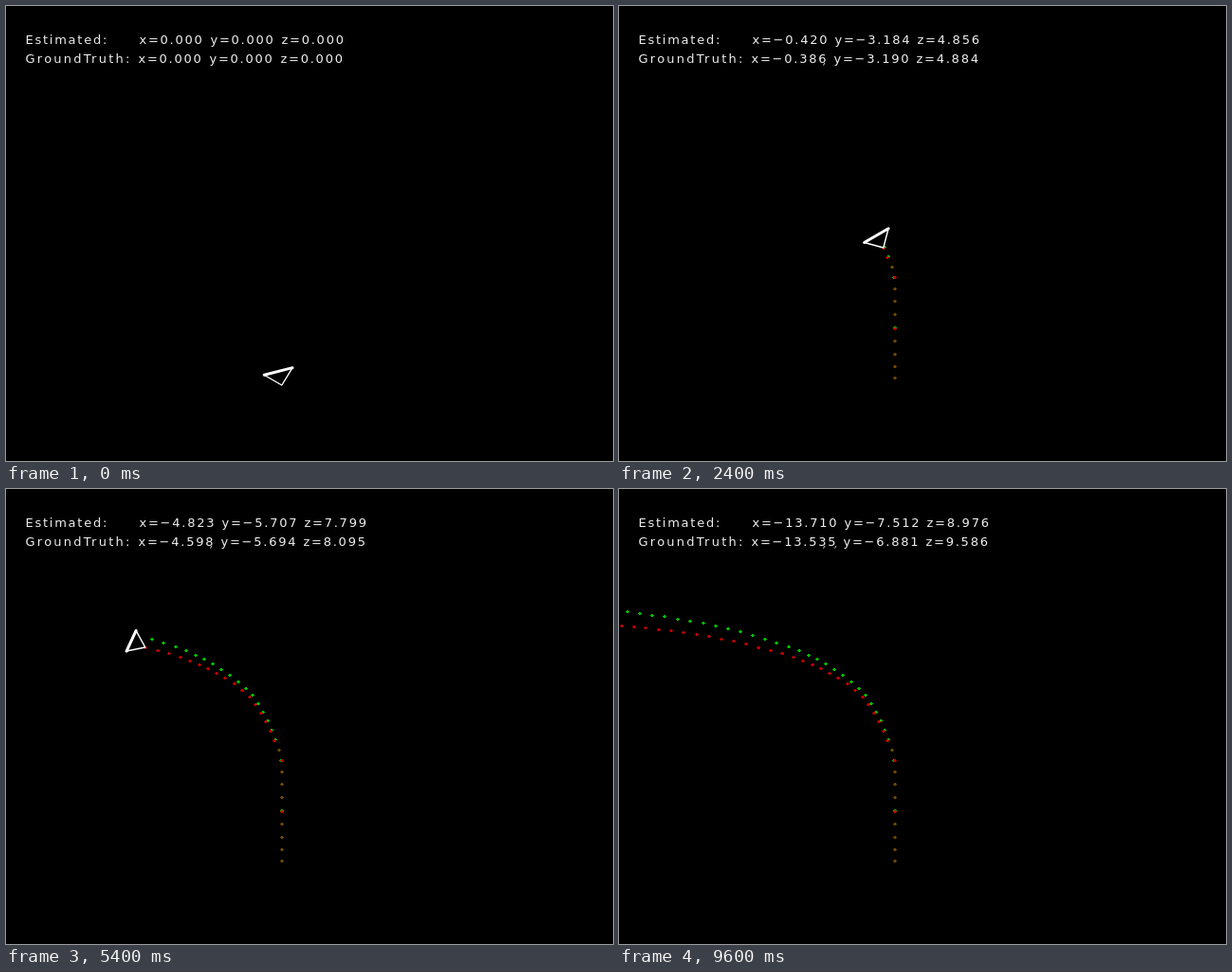
An HTML page for the animation above (9800 ms loop, 640 px wide and 480 px high).

```html
<!DOCTYPE html>
<html lang="en">
<head>
<meta charset="utf-8">
<title>Trajectory</title>
<style>
  html, body { margin: 0; width: 100%; height: 100%; overflow: hidden; background: #000; }
  svg { display: block; }
  text { font: 13px "DejaVu Sans", sans-serif; letter-spacing: 1.75px; fill: #eee; }
  .wide { letter-spacing: 2.25px; }
  .marker { fill: none; stroke: #fff; stroke-linecap: round; stroke-linejoin: round; }
</style>
</head>
<body>
<svg width="640" height="480" viewBox="0 0 640 480">
  <g shape-rendering="crispEdges">
    <path id="truth" fill="#00c000"/>
    <path id="guess" fill="#c00000"/>
    <path id="both" fill="#704800"/>
  </g>
  <path id="sides" class="marker" stroke-width="1.4"/>
  <path id="base" class="marker" stroke-width="3"/>
  <text x="20.5" y="40">Estimated:</text>
  <text x="20.5" y="60" class="wide">GroundTruth:</text>
  <g id="values"></g>
  <path id="traces" fill="none" stroke="#ddd"/>
</svg>
<script>
const STEP = 200, COUNT = 49, SCALE = 30;
const $ = id => document.getElementById(id);

// Key points of the true path: step, x, y, z in metres
const PATH = [
  [0, 0, 0, 0], [4, .001, -1.01, 1.583], [8, -.0001, -2.207, 3.427],
  [12, -.386, -3.19, 4.884], [16, -1.049, -4.01, 6.106], [20, -2.149, -4.78, 7.017],
  [24, -3.384, -5.35, 7.683], [27, -4.598, -5.694, 8.095], [31, -6.317, -6.07, 8.551],
  [35, -8.11, -6.377, 8.867], [40, -10.253, -6.591, 9.142], [48, -13.535, -6.881, 9.586]
];

// How far the estimate strays from the truth
const DRIFT = [
  [0, 0, 0, 0], [8, .0151, -.016, -.012], [16, -.108, .027, -.057], [27, -.225, -.013, -.296],
  [35, -.223, -.156, -.439], [40, -.21, -.311, -.522], [48, -.175, -.631, -.61]
];

// Monotone cubic through the key points, easing at both ends
function curve(keys, t) {
  const last = keys.length - 1;
  const n = Math.min(keys.findLastIndex(k => k[0] <= t), last - 1);
  const span = keys[n + 1][0] - keys[n][0], s = (t - keys[n][0]) / span;

  return [1, 2, 3].map(c => {
    const slope = k => (keys[k + 1][c] - keys[k][c]) / (keys[k + 1][0] - keys[k][0]);
    const tangent = k => {
      if (k === 0) return slope(0) / 2;
      if (k === last) return slope(last - 1) / 2;
      const a = slope(k - 1), b = slope(k);
      return a * b > 0 ? 2 * a * b / (a + b) : 0;
    };
    const ease = s * s * (3 - 2 * s);
    return keys[n][c] * (1 - ease) + keys[n + 1][c] * ease
      + span * s * (1 - s) * ((1 - s) * tangent(n) - s * tangent(n + 1));
  });
}

const steps = Array.from({ length: COUNT }, (_, i) => {
  const truth = curve(PATH, i), drift = curve(DRIFT, i);
  return { truth, guess: truth.map((v, c) => v + drift[c]) };
});

const screen = ([x, , z]) => [290 + Math.trunc(SCALE * x), 400 - Math.trunc(SCALE * z)];
const dot = ([x, y]) => `M${x - 1} ${y}h1v-1h2v1h1v1h-1v1h-2v-1h-1z`;
const wordWidth = v => 75 + (v < 0 ? 12 : 0) + (Math.abs(v) >= 10 ? 10 : 0);

const words = Array.from({ length: 6 }, () => {
  const el = document.createElementNS("http://www.w3.org/2000/svg", "text");
  return $("values").appendChild(el);
});

function writeRow(row, point, x, y) {
  point.forEach((v, c) => {
    const el = words[row * 3 + c];
    el.setAttribute("x", x);
    el.setAttribute("y", y);
    el.textContent = `${"xyz"[c]}=${v.toFixed(3).replace("-", "\u2212")}`;
    x += wordWidth(v);
  });
}

function drawDots(last) {
  const d = { truth: "", guess: "", both: "" };
  for (const { truth, guess } of steps.slice(1, last + 1)) {
    const a = dot(screen(truth)), b = dot(screen(guess));
    if (a === b) d.both += a;
    else {
      d.truth += a;
      d.guess += b;
    }
  }
  for (const id in d) $(id).setAttribute("d", d[id]);
}

// A triangle that turns left and foreshortens
function drawMarker(i) {
  const [px, y] = screen(steps[i].guess), x = px + .8;
  const r = 21.5 - .05 * i, s = Math.min(1, i / 42);
  const corner = deg => {
    const a = deg * Math.PI / 180;
    return `${x + r * Math.cos(a)} ${y - r * Math.sin(a)}`;
  };
  const left = corner(150 + i + .02 * i * i);
  const right = corner(58.5 + 85 * s * s * (3 - 2 * s));
  $("sides").setAttribute("d", `M${left}L${x} ${y}L${right}`);
  $("base").setAttribute("d", `M${left}L${right}`);
}

// The tail of each "y" stays behind whenever the lower row has grown
function drawTraces(i) {
  const spots = new Set(steps.slice(0, i).map(p => wordWidth(p.truth[0])));
  spots.delete(wordWidth(steps[i].truth[0]));
  $("traces").setAttribute("d", [...spots].map(w => `M${w + 142} 60l-1.5 2.5`).join(""));
}

let shown = -1;
function show(i) {
  if (i === shown) return;
  shown = i;
  writeRow(0, steps[i].guess, 140.5, 40);
  writeRow(1, steps[i].truth, 139.5, 60);
  drawDots(i);
  drawMarker(i);
  drawTraces(i);
}

const start = performance.now();
function tick() {
  show(Math.floor((performance.now() - start) / STEP) % COUNT);
  requestAnimationFrame(tick);
}
tick();
</script>
</body>
</html>
```
